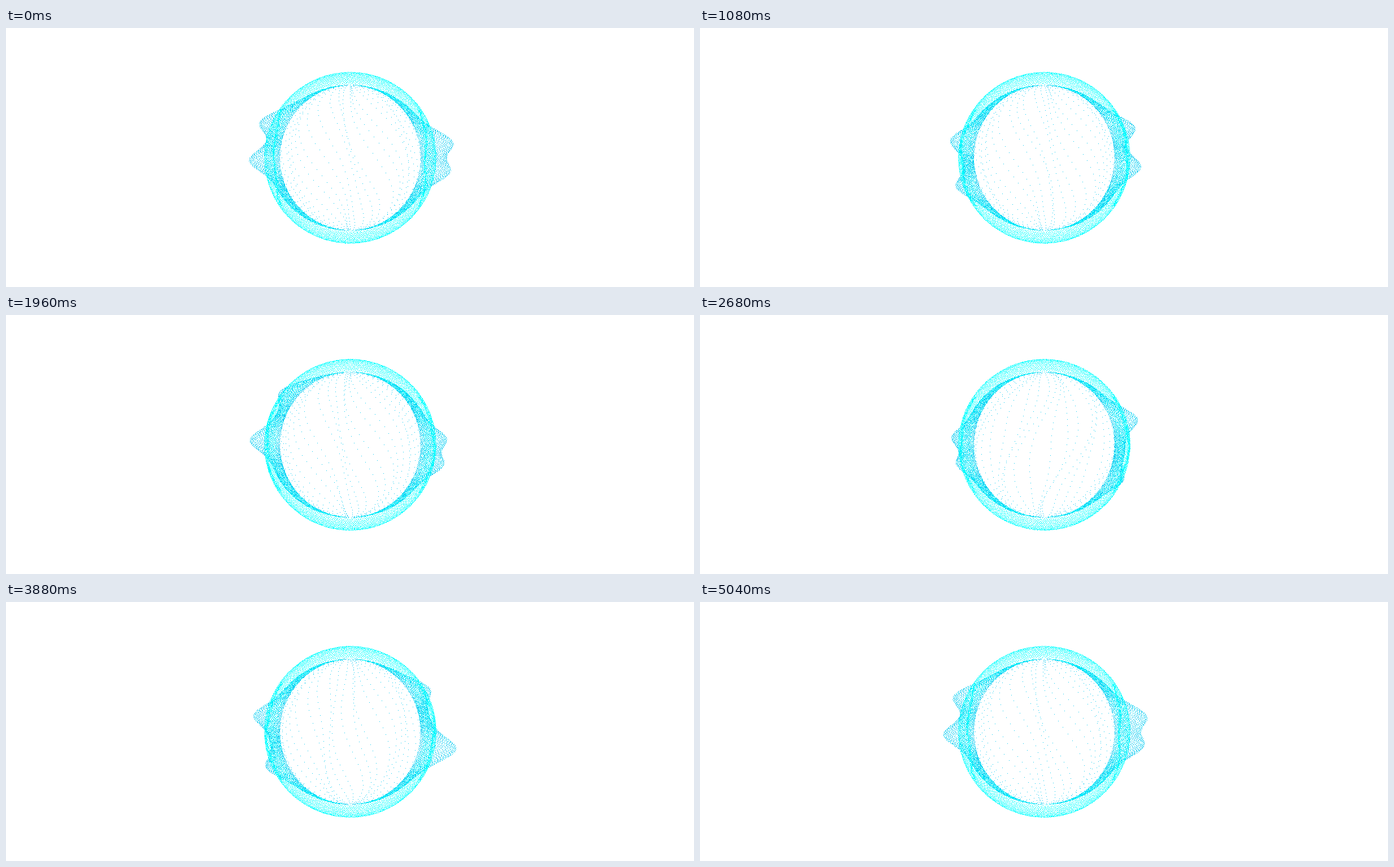
These frames come from a looping animation (1218x460 px, 5080 ms). An HTML page with a canvas:

```html
<!DOCTYPE html>
<html lang="en">
<head>
<meta charset="utf-8">
<title>Particle ring</title>
<style>
  html, body { margin: 0; width: 100%; height: 100%; overflow: hidden; background: #fff; }
  canvas { display: block; width: 1218px; height: 460px; }
</style>
</head>
<body>
<canvas id="stage" width="1218" height="460"></canvas>
<script>
const W = 1218, H = 460, CX = 609, CY = 230;
const LOOP = 5080, STEP = 40;
const OUTER = 152, IN_X = 124.5, IN_Y = 129, SKIN = 143;
const TAU = Math.PI * 2, GOLDEN = 0.6180339887;
const WHITE = 0xffffffff, SOFT = 0xfff0c800, CYAN = 0xffffff00;

// Two lobes per side glide through these poses: [y, height]
const poses = [
  { t: 0, left: [[165, 36], [235, 36]], right: [[203, 42], [255, 36]] },
  { t: 680, left: [[207, 17], [267, 31]], right: [[172, 33], [232, 26]] },
  { t: 1480, left: [[190, 38], [300, 20]], right: [[177, 29], [262, 33]] },
  { t: 1960, left: [[132, 28], [222, 35]], right: [[220, 28], [266, 28]] },
  { t: 2680, left: [[217, 22], [265, 18]], right: [[183, 32], [295, 16]] },
  { t: 3880, left: [[200, 32], [295, 25]], right: [[152, 26], [262, 49]] },
  { t: 4500, left: [[222, 48], [270, 14]], right: [[205, 36], [245, 32]] },
];
poses.push({ ...poses[0], t: LOOP });

const ctx = document.getElementById('stage').getContext('2d');
const img = ctx.createImageData(W, H);
const px = new Uint32Array(img.data.buffer);

const frac = v => v - Math.floor(v);
const mix = (a, b, k) => a + (b - a) * k;
const hash = n => frac(Math.sin(n * 12.9898) * 43758.5453);
const flat = dy => Math.sqrt(Math.max(0, 1 - (dy / IN_Y) ** 2));

// Sweep from 0 to 1 and back, gathering dots near both ends
function fold(s, gather) {
  const p = frac(s);
  return mix(1 - Math.abs(2 * p - 1), 0.5 - 0.5 * Math.cos(TAU * p), gather);
}

function plot(x, y, color) {
  const i = Math.round(y) * W + Math.round(x);
  px[i] = px[i] === WHITE ? color : CYAN;
}

function lobesAt(t, side) {
  const n = poses.findIndex(pose => pose.t > t);
  const a = poses[n - 1], b = poses[n];
  const u = (t - a.t) / (b.t - a.t), k = u * u * (3 - 2 * u);
  return a[side].map((from, i) => {
    const [y, height] = from.map((v, c) => mix(v, b[side][i][c], k));
    return { dy: y - CY, height, spread: 14 + 0.3 * height };
  });
}

function drawRing(p) {
  const n = 7200;
  for (let i = 0; i < n; i++) {
    const a = TAU * frac(i * GOLDEN);
    const ripple = 0.04 * Math.sin(5 * a + TAU * p);
    const k = Math.sqrt(fold(i / n + p + ripple, 0.55));
    plot(CX + Math.cos(a) * mix(IN_X + 3, OUTER, k),
         CY + Math.sin(a) * mix(IN_Y, OUTER, k), CYAN);
  }
}

function drawSkin(dir, lobes, p) {
  const n = 3800;
  for (let i = 0; i < n; i++) {
    const dy = IN_Y * (2 * frac(i * GOLDEN) - 1), c = flat(dy);
    let edge = SKIN * c;
    for (const l of lobes) edge += l.height * Math.min(1, 2 * c) * Math.exp(-(((dy - l.dy) / l.spread) ** 2));
    plot(CX + dir * mix(IN_X * c, edge, fold(i / n + p, 0.4)), CY + dy, SOFT);
  }
}

// Dense crease where the skin turns back behind the rim
function drawCrease(dir, p) {
  const pull = 14 * ((1 + Math.cos(TAU * p)) / 2) ** 6;
  for (let i = 0; i < 480; i++) {
    const dy = mix(-85, 85, i / 479);
    const wave = Math.sin(dy / 15 + dir + TAU * p);
    const inset = 4 + (pull + 2 * wave) * Math.cos(dy / 85 * Math.PI / 2);
    const x = Math.sqrt(OUTER * OUTER - dy * dy) - inset + 4 * (hash(i) - 0.5);
    plot(CX + dir * x, CY + dy, CYAN);
  }
}

function drawMeridians(p) {
  const lines = 20, dots = 32;
  const shear = 0.55 * Math.cos(5 * TAU * p);
  for (let j = 0; j < lines; j++) {
    const start = (j + 0.7 * hash(j + 1)) / lines + 2 * p;
    for (let i = 0; i < dots; i++) {
      const phi = mix(-1.45, 1.45, (i + hash(j * 7 + 3)) / dots);
      const bend = shear * Math.sin(phi) + 0.1 * Math.sin(3 * phi + j + TAU * p);
      const lon = Math.PI * (frac(start + bend / Math.PI) - 0.5);
      plot(CX + IN_X * Math.cos(phi) * Math.sin(lon), CY + IN_Y * Math.sin(phi), SOFT);
    }
  }
}

function draw(t) {
  const p = t / LOOP;
  px.fill(WHITE);
  drawMeridians(p);
  for (const [side, dir] of [['left', -1], ['right', 1]]) {
    drawSkin(dir, lobesAt(t, side), p);
    drawCrease(dir, p);
  }
  drawRing(p);
  ctx.putImageData(img, 0, 0);
}

const begin = performance.now();
let shown = -1;
function tick() {
  const t = Math.floor((performance.now() - begin) % LOOP / STEP) * STEP;
  if (t !== shown) draw(shown = t);
  requestAnimationFrame(tick);
}
tick();
</script>
</body>
</html>
```
